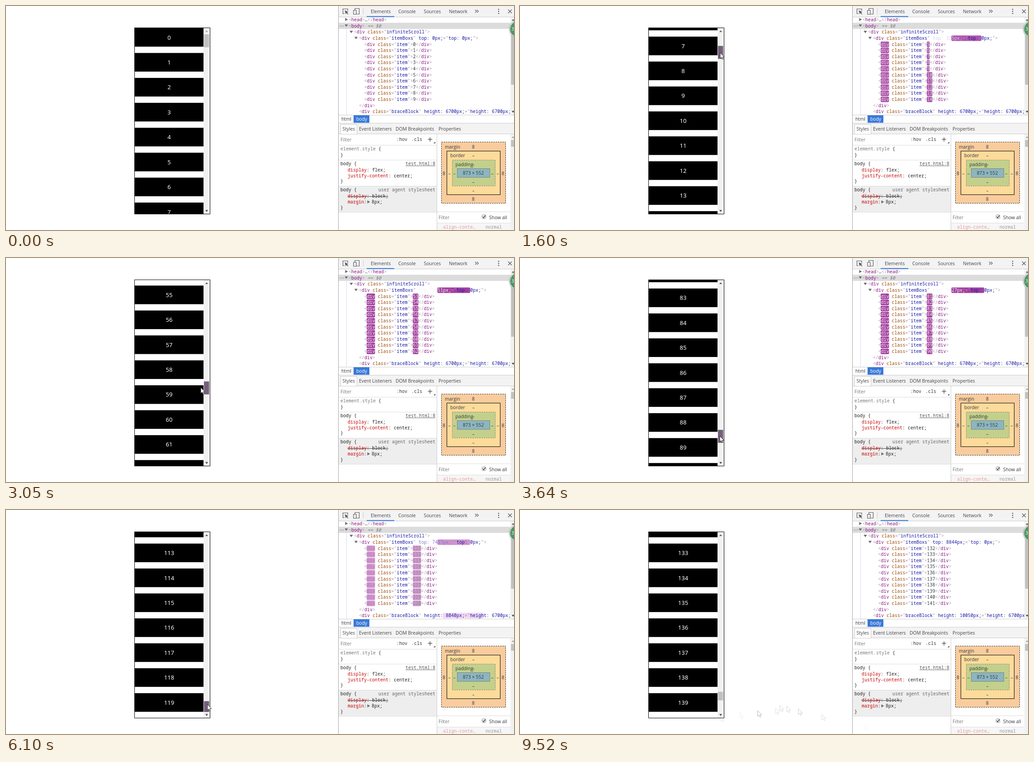
These frames come from a looping animation (1124 by 498 pixels, 9.55 s). An HTML page:

```html
<!DOCTYPE html>
<html lang="en">
<head>
<meta charset="utf-8">
<title>Infinite scroll</title>
<style>
html, body { margin: 0; width: 100%; height: 100%; overflow: hidden; background: #fff; }
svg { display: block; width: 1124px; height: 498px; }
text { white-space: pre; }
.ui { font: 10.3px "Open Sans", "Noto Sans", sans-serif; }
.code { font: 10px "Noto Sans Mono", "Liberation Mono", monospace; }
.num { font: 13px "Noto Sans", "Open Sans", sans-serif; }
</style>
</head>
<body>
<svg id="stage" viewBox="0 0 1124 498"></svg>
<script>
const LOOP = 9550, ROW = 67, SCALE = 55.43 / 67, CHAR = 6;
const stage = document.getElementById('stage');
const BRACKET = '#a894a6', TAG = '#881280', ATTR = '#994500', VALUE = '#1a1aa6', INK = '#303942';

// ---------- drawing helpers ----------
function add(name, attrs = {}, parent = stage) {
  const el = document.createElementNS('http://www.w3.org/2000/svg', name);
  set(el, attrs);
  parent.appendChild(el);
  return el;
}
function set(el, attrs) {
  for (const key in attrs) el.setAttribute(key, attrs[key]);
}
const box = (x, y, width, height, fill, more = {}, parent = stage) =>
  add('rect', { x, y, width, height, fill, ...more }, parent);
const path = (d, fill, more = {}, parent = stage) => add('path', { d, fill, ...more }, parent);
const line = (d, stroke, width = 1) => path(d, 'none', { stroke, 'stroke-width': width });

// Text is placed by its vertical middle.
function label(x, mid, str, fill = INK, cls = 'ui', anchor = 'start', parent = stage) {
  const el = add('text', { x, y: mid + 3.6, fill, class: cls, 'text-anchor': anchor }, parent);
  el.textContent = str;
  return el;
}
// A code line made of [text, colour] parts; returns its spans.
function code(x, mid, ...parts) {
  const el = add('text', { x, y: mid + 3.4, class: 'code' });
  return parts.map(([str, fill]) => {
    const span = add('tspan', { fill }, el);
    span.textContent = str;
    return span;
  });
}
const open = (name, ...attrs) => [
  ['<', BRACKET], [name, TAG],
  ...attrs.flatMap(([key, value]) => [[' ', BRACKET], [key, ATTR], ['="', BRACKET], [value, VALUE], ['"', BRACKET]]),
  ['>', BRACKET]
];
const close = name => [['</', BRACKET], [name, TAG], ['>', BRACKET]];
const rowY = i => 30.8 + 13.6 * i;
const right = (x, y) => path(`M${x - 2.5} ${y - 3.5}l6 3.5l-6 3.5z`, '#6e6e6e');
const down = (x, y, fill = '#6e6e6e', r = 3.7) => path(`M${x - r} ${y - r * .7}h${2 * r}l${-r} ${r * 1.5}z`, fill);
const up = (x, y, fill, r = 3) => path(`M${x - r} ${y + r * .6}h${2 * r}l${-r} ${-r * 1.2}z`, fill);

// ---------- scrolling list ----------
const clip = add('clipPath', { id: 'view' });
box(285, 49, 152, 413.5, '#000', {}, clip);
const list = add('g', { 'clip-path': 'url(#view)' });
const cells = Array.from({ length: 9 }, () => {
  const g = add('g', {}, list);
  box(285, 0, 152, 41.4, '#000', {}, g);
  return { g, text: label(361, 21.9, '', '#fff', 'num', 'middle', g) };
});
box(437, 49, 14, 413, '#f1f1f1');
const upArrow = up(444, 56, '#505050');
down(444, 455.5, '#505050', 3);
const thumb = box(438, 63, 11.5, 29, '#c1c1c1');
box(284.5, 48.5, 167, 414, 'none', { stroke: '#000' });

// ---------- inspector: toolbar and element tree ----------
box(736, 0, 388, 24, '#f3f3f3');
line('M736 24.5H1124', '#ccc');
path('M756 11V6.5H745.5V17H749', 'none', { stroke: '#5a5a5a', 'stroke-width': 1.2 });
path('M749.5 9.5l8 4l-3 1l3 3.2l-1.2 1.1l-3-3.2l-1.6 2.6z', '#5a5a5a');
path('M772 9V5.5H781.5V18H776M769 9.5h6v9h-6z', 'none', { stroke: '#5a5a5a', 'stroke-width': 1.2 });
line('M790.5 5V19', '#ccc');
[['Elements', 807], ['Console', 868], ['Sources', 924.5], ['Network', 980]].forEach(([s, x]) => label(x, 12, s, '#444'));
box(798, 22.5, 61, 2, '#3879d9');
line('M1038 8.5l3.2 3.2l-3.2 3.2M1042 8.5l3.2 3.2l-3.2 3.2', '#555', 1.2);
[7.5, 12, 16.5].forEach(cy => add('circle', { cx: 1090, cy, r: 1.3, fill: '#5a5a5a' }));
line('M1111 8l8 8m0-8l-8 8', '#5a5a5a', 1.4);

box(736, 37.3, 380, 13.6, '#dcdcdc');
line('M753.5 51V243', '#cfdcf0');
right(753, 30);
code(758, rowY(0), ...open('head'), ['…', INK], ...close('head'));
[740, 743.5, 747].forEach(cx => add('circle', { cx, cy: 44.5, r: .9, fill: '#8a8a8a' }));
down(753, 43.5);
const selected = code(758, rowY(1), ...open('body'), [' == $0', '#777']);
selected[3].setAttribute('font-style', 'italic');
down(764, 57.5);
code(770, rowY(2), ...open('div', ['class', 'infiniteScroll']));
down(774.5, 71);

// A rect behind a span that flashes when its value changes.
const mark = (x, row) => box(x, rowY(row) - 6.2, 0, 12.4, 'none', { rx: 2 });
const topMark = mark(954.5, 3);
const topSpan = code(781, rowY(3), ...open('div', ['class', 'itemBoxs'], ['style', 'top: 0px;']))[8];
const nodes = Array.from({ length: 10 }, (_, i) => {
  const row = i + 4, tagMark = mark(798, row), textMark = mark(900, row);
  const spans = code(792.5, rowY(row), ...open('div', ['class', 'item']), ['0', INK], ...close('div'));
  return { tagMark, textMark, tag: spans[1], text: spans[8] };
});
code(781, rowY(14), ...close('div'));
const heightMark = mark(966.5, 15);
const heightSpan = code(781, rowY(15), ...open('div', ['class', 'braceBlock'], ['style', 'height: 6700px;']), ...close('div'))[8];

box(1116, 25, 8, 218, '#f1f1f1');
box(1117.5, 38, 6.5, 137, '#c1c1c1');
up(1122, 31, '#505050');
down(1122, 235, '#505050', 3);
add('circle', { cx: 1133, cy: 51.5, r: 18.5, fill: '#4c9464', stroke: '#d9dedb', 'stroke-width': 2 });
add('circle', { cx: 1133, cy: 51.5, r: 19.7, fill: 'none', stroke: '#8a8f8c', 'stroke-width': .7 });
label(1118, 51.5, '3', '#fff').setAttribute('font-weight', 'bold');

// ---------- inspector: breadcrumb and styles ----------
box(736, 243, 388, 17, '#fff');
line('M736 242.5H1124M736 260.5H1124', '#ccc');
label(742, 251.3, 'html');
box(769, 243, 35, 16.5, '#3879d9');
label(775, 251.3, 'body', '#fff');
box(736, 261, 388, 23, '#f3f3f3');
line('M736 284.5H1124', '#ccc');
box(740.5, 263.5, 36, 21.5, '#fff', { stroke: '#ccc' });
[['Styles', 744.5], ['Event Listeners', 781], ['DOM Breakpoints', 862], ['Properties', 957]].forEach(([s, x]) => label(x, 273.3, s, '#444'));

label(740, 297, 'Filter', '#777');
code(864, 296.7, [':hov', '#333']);
code(897, 296.7, ['.cls', '#333']);
line('M933.5 296.5h9.5M938.2 292v9.5', '#5a5a5a', 1.4);
path('M950 301.5v4h-4z', '#5a5a5a');
box(736, 400, 217, 58, '#eee');
line('M736 309.5H953M736 342.5H953M736 400.5H953M736 458.5H953', '#ddd');
const RED = '#c80000', DARK = '#222';
code(740, 318, ['element.style', '#777'], [' {', DARK]);
code(740, 332, ['}', DARK]);
code(740, 351, ['body {', DARK]);
code(884, 351, ['test.html:8', '#555']);
line('M884 355.5H950', '#555', .8);
code(756, 365, ['display', RED], [': flex;', DARK]);
code(756, 377.5, ['justify-content', RED], [': center;', DARK]);
code(740, 390, ['}', DARK]);
code(740, 409, ['body {', DARK]);
code(824, 409, ['user agent stylesheet', '#666']);
code(756, 423, ['display', RED], [': block;', DARK]);
line('M756 423.5H846', '#333', .9);
code(756, 436, ['margin', RED], [':', DARK]);
right(802, 435.5);
code(809, 436, ['8px;', DARK]);
code(740, 448.5, ['}', DARK]);

// ---------- inspector: box model ----------
const dash = { 'stroke-dasharray': '3 2' };
box(963.5, 302.5, 142, 136, '#f9cc9d', { stroke: '#222', ...dash });
box(975.5, 322.5, 118, 97, '#fddb9a', { stroke: '#000' });
box(987.5, 342.5, 95, 57.5, '#c3d08b', { stroke: '#808080', ...dash });
box(998.5, 361.5, 72, 19.5, '#8cb6c0', { stroke: '#808080' });
label(971, 313.5, 'margin');
label(983, 332.5, 'border');
label(994.5, 352, 'padding');
[[1034, 313.5, '8'], [1034, 332.5, '–'], [1034, 352, '–'], [1034, 391, '–'], [1034, 410, '–'], [1034, 429.7, '8'],
 [969, 372, '8'], [981, 372, '–'], [992, 372, '–'], [1076, 372, '–'], [1088, 372, '–'], [1099.5, 372, '8'],
 [1034, 371, '873 × 552']].forEach(([x, y, s]) => label(x, y, s, INK, 'ui', 'middle'));
line('M954 457.5H1116M954 482.5H1116', '#ddd');
label(957, 470, 'Filter', '#777');
box(1053.5, 464.5, 8, 8, '#fff', { stroke: '#888', rx: 1 });
line('M1055 468.5l2 2.2l3.6-5', '#333', 1.5);
label(1069, 470, 'Show all');
box(954, 483, 162, 15, '#f6f6f6');
code(967, 491.5, ['align-conte…', '#e79a96']);
code(1061, 491.5, ['normal', '#999']);
box(1116, 285, 8, 213, '#f1f1f1');
box(1117.5, 298, 6.5, 15, '#c1c1c1');
up(1122, 291.5, '#a0a0a0');
line('M735.5 0V498', '#a3a3a3');
line('M953.5 285V498', '#ccc');

// ---------- pointer ----------
const ARROW = 'M0 0V12.6L2.9 10L5 14.6L7 13.7L5 9.3H9Z';
const exit = [[8300, 444, 458], [8380, 486, 450], [8440, 526, 446], [8500, 565, 440], [8525, 575, 434],
  [8550, 590, 436], [8600, 616, 442], [8660, 668, 454], [8720, 763, 476], [8760, 830, 498]];
const faint = [.12, .12, .6, .22, .3, .3, .4, .25, .06, 0];
const trail = exit.map(([time, x, y], i) => ({
  time,
  el: path(ARROW, '#fff', { stroke: '#6b5a6b', 'stroke-width': .8, opacity: faint[i], transform: `translate(${x} ${y})` })
}));
const pointer = path(ARROW, '#fff', { stroke: '#222', 'stroke-width': .9 });

// ---------- motion ----------
const scrollKeys = [[970, 0], [1600, 445], [2140, 949], [3050, 3667], [3850, 6200], [4200, 6200], [4840, 6648],
  [5050, 6870], [5450, 6870], [5850, 7540], [6250, 7540], [6700, 8210], [7200, 8210], [7240, 8557], [7580, 8557], [7700, 8880]];
const pointerKeys = [[120, 1088, 490], [400, 700, 300], [600, 414, 100], [770, 443, 78], [970, 443, 78], [1600, 443, 104],
  [2140, 440, 131], [3050, 431, 288], [3850, 446, 434], [4840, 446, 430], [5300, 447, 462], [5700, 446, 432],
  [7560, 445, 434], [8150, 445, 434], ...exit];
const loads = [4100, 5250, 6200, 7200, 8120];

function follow(keys, t) {
  const i = keys.findIndex(k => k[0] > t);
  if (i === 0) return keys[0].slice(1);
  if (i < 0) return keys[keys.length - 1].slice(1);
  const a = keys[i - 1], b = keys[i], p = (t - a[0]) / (b[0] - a[0]);
  return a.slice(1).map((v, j) => v + (b[j + 1] - v) * p);
}
const scrollAt = t => follow(scrollKeys, t)[0];
const firstAt = t => Math.max(0, Math.floor(scrollAt(t) / ROW + 1e-6) - (t < 7220 ? 1 : 0));
const lastLoad = t => loads.filter(at => at <= t).pop() ?? -LOOP;

function ageOfFirst(t) {
  const now = firstAt(t);
  let age = 0;
  while (age < 1400 && firstAt(t - age) === now) age += 10;
  return Math.max(0, age - 5);
}

// cubic-bezier(0, 0, .2, 1)
function ease(x) {
  let lo = 0, hi = 1, u = .5;
  for (let i = 0; i < 16; i++) {
    u = (lo + hi) / 2;
    if (.6 * u * u * (1 - u) + u * u * u < x) lo = u; else hi = u;
  }
  return u * u * (3 - 2 * u);
}
const rgb = hex => [1, 3, 5].map(i => parseInt(hex.slice(i, i + 2), 16));
function mix(a, b, p) {
  const to = rgb(b);
  return `rgb(${rgb(a).map((v, i) => Math.round(v + (to[i] - v) * p))})`;
}
function flash(rect, span, age, base) {
  const p = ease(Math.min(1, age / 1120));
  set(rect, {
    width: span.textContent.length * CHAR + .5,
    fill: mix('#9e3699', '#f5dbf4', p),
    opacity: age < 1120 ? 1 : age < 1400 ? 1 - ease((age - 1120) / 280) : 0
  });
  span.setAttribute('fill', mix('#ffffff', base, p));
}

function draw(t) {
  const scroll = scrollAt(t), top = Math.floor(scroll / ROW);
  cells.forEach(({ g, text }, i) => {
    g.setAttribute('transform', `translate(0 ${49 + ((top + i) * ROW - scroll) * SCALE})`);
    text.textContent = top + i;
  });

  const height = 6700 + 670 * loads.filter(at => at <= t).length;
  set(thumb, {
    y: 63 + 386 * scroll / height,
    height: 386 * 500 / height,
    fill: t < 700 || t >= 7200 ? '#c1c1c1' : t < 970 ? '#a8a8a8' : '#75607c'
  });
  upArrow.setAttribute('fill', scroll > 0 ? '#505050' : '#a0a0a0');

  const first = firstAt(t), age = ageOfFirst(t), loadAge = t - lastLoad(t);
  const nodeAge = Math.min(age, loadAge);
  topSpan.textContent = `top: ${first * ROW}px;`;
  flash(topMark, topSpan, age, VALUE);
  heightSpan.textContent = `height: ${height}px;`;
  flash(heightMark, heightSpan, loadAge, VALUE);
  nodes.forEach((n, i) => {
    n.text.textContent = first + i;
    flash(n.tagMark, n.tag, nodeAge, TAG);
    flash(n.textMark, n.text, nodeAge, INK);
  });

  const [x, y] = follow(pointerKeys, t);
  set(pointer, { transform: `translate(${x} ${y})`, visibility: t >= 120 && t < 8760 ? 'visible' : 'hidden' });
  trail.forEach(({ time, el }) => el.setAttribute('visibility', t > time ? 'visible' : 'hidden'));
}

const begin = performance.now();
function tick() {
  draw((performance.now() - begin) % LOOP);
  requestAnimationFrame(tick);
}
tick();
</script>
</body>
</html>
```
